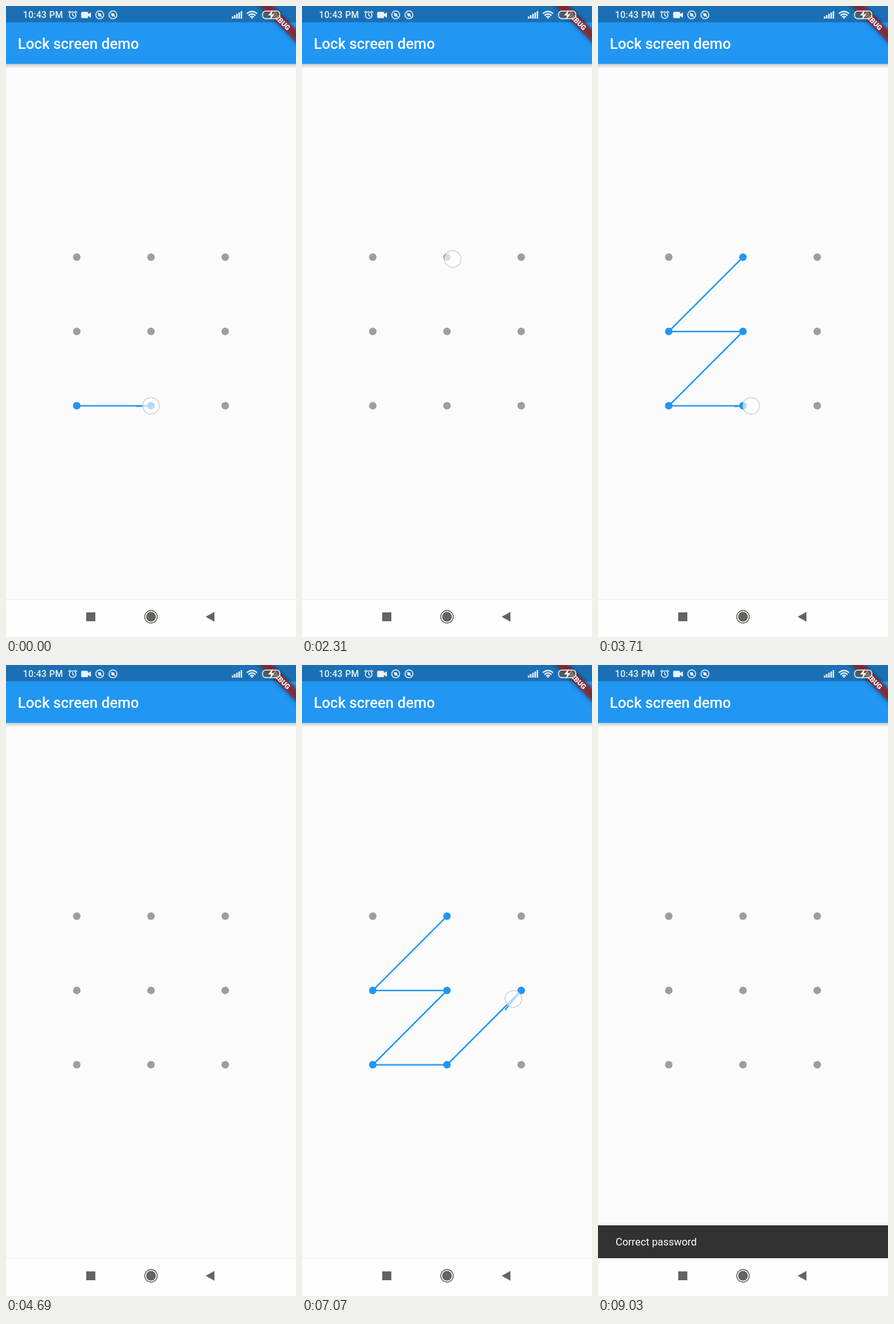
Write an HTML page that moves like this. It is 461 by 1000 pixels and loops after 9.1 s.

```html
<!DOCTYPE html>
<html lang="en">
<head>
<meta charset="utf-8">
<title>Lock screen demo</title>
<style>
  html, body { margin: 0; width: 100%; height: 100%; overflow: hidden; background: #fbfbfb; }
  svg { display: block; width: 100vw; height: 100vh; }
  text { font-family: Roboto, sans-serif; fill: #fff; }
  .outline { fill: none; stroke: #e9f2fa; stroke-width: 1.5; stroke-linecap: round; }
  .solid { fill: #e9f2fa; }
  .nav { fill: #65625f; }
</style>
</head>
<body>
<svg viewBox="0 0 461 1000">
  <defs>
    <linearGradient id="shade" x2="0" y2="1">
      <stop offset="0" stop-color="#000" stop-opacity=".2"/>
      <stop offset="1" stop-color="#000" stop-opacity="0"/>
    </linearGradient>
    <filter id="blur" x="-20%" y="-100%" width="140%" height="300%">
      <feGaussianBlur stdDeviation="3.5"/>
    </filter>
  </defs>
  <rect width="461" height="1000" fill="#fbfbfb"/>
  <rect y="91.6" width="461" height="7" fill="url(#shade)"/>
  <rect width="461" height="91.8" fill="#2196f3"/>
  <rect width="461" height="25.8" fill="#1b70b5"/>
  <text x="18.8" y="68" font-size="23.46" font-weight="500">Lock screen demo</text>

  <g transform="translate(461 0) rotate(45)">
    <rect x="-60" y="26.5" width="120" height="14" fill-opacity=".5" filter="url(#blur)"/>
    <rect x="-60" y="26.5" width="120" height="14" fill="#b71c1c" fill-opacity=".63"/>
    <text y="37.6" font-size="11.2" font-weight="900" text-anchor="middle">DEBUG</text>
  </g>

  <text x="27" y="19" font-size="14.2" font-weight="500" letter-spacing=".35" fill-opacity=".92">10:43 PM</text>
  <g class="outline">
    <circle cx="106" cy="14.5" r="5.3"/>
    <path d="M106 11.5V14.8L108 16M99.6 10.2L102 8.2M112.4 10.2L110 8.2"/>
    <circle cx="149" cy="14" r="6.3"/>
    <circle cx="170" cy="14" r="6.3"/>
    <path d="M146.5 11.5L152 17M167.5 11.5L173 17"/>
    <path stroke-width="2" d="M383.5 11.6Q391 5.6 398.5 11.6M386 14.6Q391 10.6 396 14.6M388.5 17.2Q391 15.4 393.5 17.2"/>
    <rect x="407.8" y="8" width="27.5" height="12" rx="5" fill="#5f5a4a" fill-opacity=".7"/>
  </g>
  <g class="solid">
    <rect x="119.5" y="9.2" width="11" height="10" rx="1.5"/>
    <path d="M130 13L135 10V18.5L130 15.5Z"/>
    <circle cx="149" cy="14" r="2.6"/>
    <circle cx="170" cy="14" r="2.6"/>
    <circle cx="391" cy="19" r="1.3"/>
    <path d="M424 6L416.5 15H421L419.5 22L427 13H422.5Z"/>
    <g id="signal"></g>
  </g>

  <g id="dots"></g>
  <polyline id="trace" fill="none" stroke="#2196f3" stroke-width="2.35" stroke-linejoin="round"/>
  <circle id="finger" r="13.2" fill="#fff" fill-opacity=".65" stroke="#b9bdc4" stroke-opacity=".65" stroke-width="1.5"/>

  <g id="snack">
    <rect y="888" width="461" height="52" fill="#323232"/>
    <text id="message" x="28" y="920" font-size="16.4">Correct password</text>
  </g>

  <rect y="940" width="461" height="60" fill="#fefefe"/>
  <rect y="940" width="461" height="1" fill="#ebe9e8"/>
  <g class="nav">
    <rect x="127.5" y="961" width="14.5" height="14"/>
    <circle cx="230.5" cy="968" r="7.7"/>
    <circle cx="230.5" cy="968" r="10" fill="none" stroke="#65625f" stroke-width="1.4"/>
    <path d="M317.5 968L331.3 960.2V975.8Z"/>
  </g>
</svg>
<script>
const LOOP = 9100, STEP = 70, SNACK_START = 7760, SNACK_TIME = 250;
const LAG = 35;      // the line trails the finger by this many ms
const REACH = 0.15;  // share of a move at which the next dot already connects
const SWING = 2.6;   // how far the finger carries on past a dot before turning
const $ = id => document.getElementById(id);

function add(parent, tag, attrs) {
  const el = document.createElementNS(parent.namespaceURI, tag);
  for (const key in attrs) el.setAttribute(key, attrs[key]);
  return parent.appendChild(el);
}

for (let i = 0; i < 5; i++) {
  const h = 3.5 + i * 2.1;
  add($('signal'), 'rect', { x: 359 + i * 3.5, y: 20 - h, width: 2.4, height: h });
}

// Dots are numbered 1 to 9, row by row; pace is the time from dot to dot.
const dots = Array.from({ length: 9 }, (_, i) => [112.5 + i % 3 * 118, 398 + Math.floor(i / 3) * 117.8]);
const marks = dots.map(([cx, cy]) => add($('dots'), 'circle', { cx, cy, r: 6 }));
const strokes = [
  { start: -298, pace: 298, path: '78541269' },
  { start: 2310, pace: 346, path: '24578' },
  { start: 4970, pace: 425, path: '2457869' }
].map(({ start, pace, path }) => ({ start, pace, route: [...path].map(d => dots[d - 1]) }));

// Speeds up towards the next dot while the previous move dies away.
function fingerAt(route, progress) {
  const p = Math.max(0, progress), i = Math.floor(p), u = p - i;
  const points = [[route[0][0] + 9, route[0][1] + 3], ...route.slice(1)];
  const from = points[i], to = points[i + 1] || from, before = points[i - 1] || from;
  const swing = SWING * u * (1 - u) ** 2;
  return from.map((v, k) => v + (to[k] - v) * u * u + (v - before[k]) * swing);
}

function drawStroke(t) {
  const stroke = strokes.find(s => t >= s.start && t < s.start + s.pace * (s.route.length - 0.5));
  let line = [];
  $('finger').style.display = stroke ? '' : 'none';
  if (stroke) {
    const { start, pace, route } = stroke;
    const [x, y] = fingerAt(route, (t - start) / pace);
    $('finger').setAttribute('cx', x);
    $('finger').setAttribute('cy', y);
    const trail = (t - LAG - start) / pace;
    if (trail >= 0) line = [...route.slice(0, Math.floor(trail + REACH) + 1), fingerAt(route, trail)];
  }
  $('trace').setAttribute('points', line.join(' '));
  marks.forEach((mark, i) => mark.setAttribute('fill', line.includes(dots[i]) ? '#2196f3' : '#9e9e9e'));
}

function drawSnack(t) {
  const shown = Math.min(1, Math.max(0, (t - SNACK_START) / SNACK_TIME));
  $('snack').style.display = shown ? '' : 'none';
  $('snack').setAttribute('transform', `translate(0 ${52 * (1 - shown) ** 3})`);
  $('message').setAttribute('opacity', Math.max(0, shown * 2 - 1));
}

const begin = performance.now();
function tick() {
  const t = Math.floor((performance.now() - begin) % LOOP / STEP) * STEP;
  drawStroke(t);
  drawSnack(t);
  requestAnimationFrame(tick);
}
tick();
</script>
</body>
</html>
```
